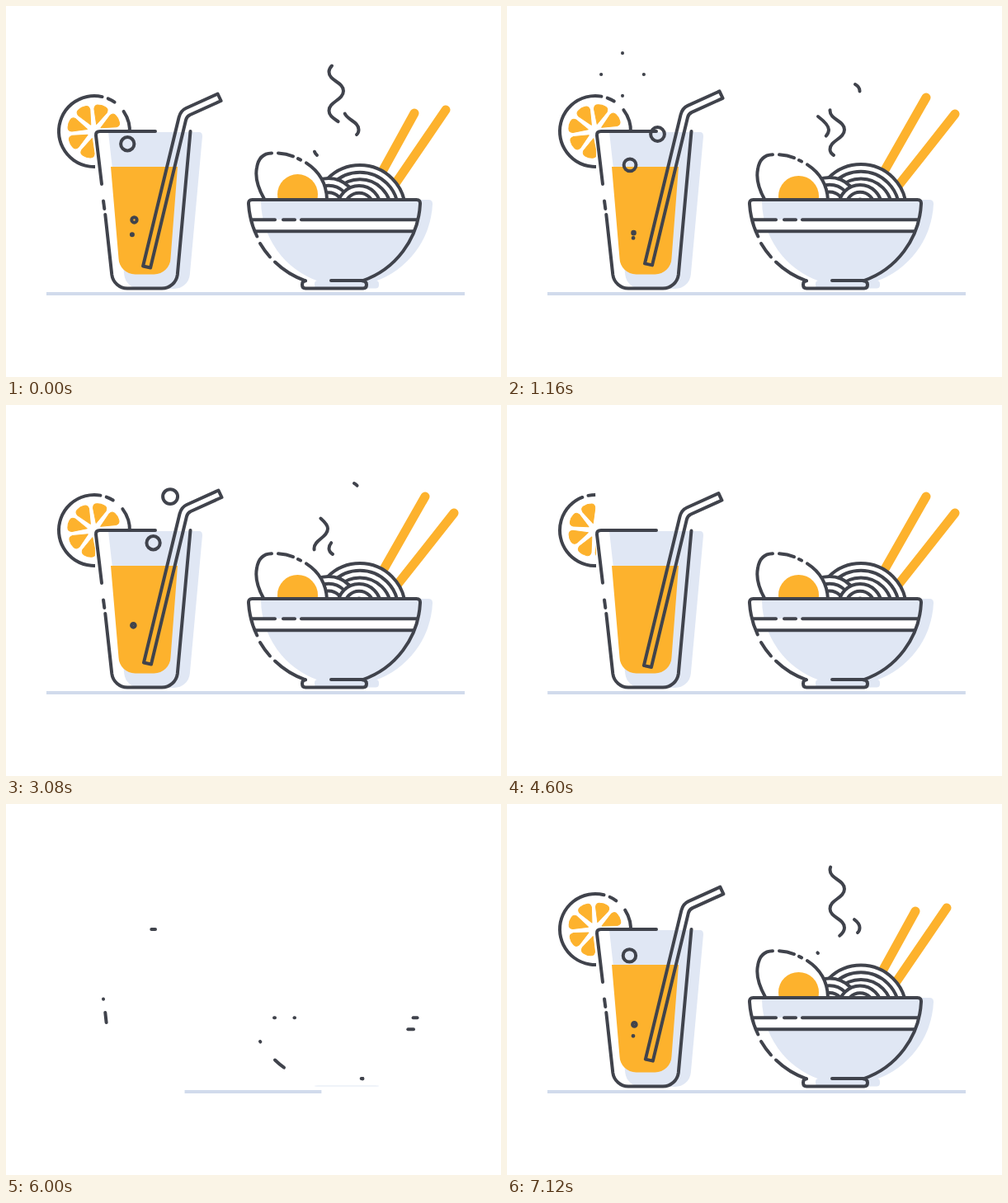
Recreate the animation shown at these times as an HTML page. Size 600x450 px, loop 7160 ms.

```html
<!DOCTYPE html>
<html>
<head>
<meta charset="utf-8">
<style>
  html, body { margin: 0; width: 100%; height: 100%; overflow: hidden; background: #fff; }
  svg { display: block; width: 100vw; height: 100vh; }
  .ink { fill: none; stroke: #40434c; stroke-width: 4; stroke-linecap: round; stroke-linejoin: round; }
  .white { fill: #fff; }
  .shade { fill: #e0e7f4; }
  .gold { fill: #fdb22d; }
  .stick { stroke: #fdb22d; stroke-width: 11; stroke-linecap: round; }
</style>
</head>
<body>
<svg viewBox="0 0 600 450">
  <defs>
    <clipPath id="aboveRim"><rect width="600" height="235"/></clipPath>
    <clipPath id="pie"><path id="piePath"/></clipPath>
  </defs>
  <line id="ground" y1="349" y2="349" stroke="#d1dbec" stroke-width="4"/>
  <g clip-path="url(#pie)"><g id="slice"></g></g>

  <path id="glassShade" class="shade" d="M124 153H234Q238 153 238 158L222.800 326A19 19 0 0 1 204 343H162A19 19 0 0 1 143.300 326Z"/>
  <path id="liquid" class="gold" d="M127 195H208L199.500 306A20 20 0 0 1 179.500 325.500H156.500A20 20 0 0 1 136.500 306Z"/>

  <g clip-path="url(#aboveRim)">
    <line id="stick1" class="stick" x2="429" y2="250"/>
    <line id="stick2" class="stick" x2="445" y2="255"/>
    <g id="noodles"></g>
    <g id="egg">
      <path class="white" d="M313 236C305 222 302 208 304 198C306 185 314 180 324 180C350 180 388 200 389 236Z"/>
      <circle class="gold" cx="353.500" cy="230.500" r="24.500"/>
      <path class="ink" d="M313 236C305 222 302 208 304 198C306 185 313 180.500 322 180.300M330 180.300Q340 181 348 184.200M354 187L357 188.500M364 192.300Q388 208 389 236"/>
    </g>
  </g>

  <path id="bowlShade" class="shade" d="M309 235H512Q517 235 517 240A104 104 0 0 1 447 334H379A104 104 0 0 1 309 236Z"/>
  <rect id="baseShade" class="shade" x="374" y="333" width="78" height="9.500" rx="4"/>
  <path class="white" d="M297 259H499L495 273H301Z"/>
  <g id="lines"></g>
  <g id="bubbles"></g>
  <path id="straw" class="ink" pathLength="1" d="M167 312.500L210.500 132Q212.500 124 219 121L257.500 103.500L261.500 112L224 129Q220 131 219 135L176 314.500Z"/>
  <g id="steam"></g>
</svg>
<script>
const LOOP = 7160;
const SKIP = 120;                   // hard cut where the loop closes
const OUT = 4520 - LOOP - SKIP;     // exit and entrance, on a clock that
const IN = 5960 - LOOP - SKIP;      // reads 0 when the loop begins

const $ = id => document.getElementById(id);
function set(el, attrs) {
  for (const k in attrs) el.setAttribute(k, attrs[k]);
}
function add(parent, tag, attrs) {
  const el = document.createElementNS('http://www.w3.org/2000/svg', tag);
  set(el, attrs);
  return parent.appendChild(el);
}
const ink = (id, d) => add($(id), 'path', { class: 'ink', pathLength: 1, d });
const show = (el, on) => { el.style.visibility = on ? 'visible' : 'hidden'; };

const clamp = x => Math.min(1, Math.max(0, x));
const sine = x => (1 - Math.cos(Math.PI * clamp(x))) / 2;
const back = x => { x = clamp(x); return x * x * (2.7 * x - 1.7); };

// 0 while in place, 1 while gone
const away = (c, outWait, inWait, len, ease = clamp) =>
  c < IN ? ease((c - OUT - outWait) / len) : ease(1 - (c - IN - inWait) / len);

// damped swing after the entrance
const swing = (c, amp, phase) =>
  c < IN ? 0 : amp * Math.exp(-Math.max(c, -200) / 350) * Math.cos(2 * Math.PI * c / 450 + phase);

function trim(el, from, to) {
  show(el, to > from);
  set(el, { 'stroke-dasharray': `${Math.max(0, to - from)} 2`, 'stroke-dashoffset': -from });
}

// point at a clockwise angle from straight up
function polar(cx, cy, r, deg) {
  const a = deg * Math.PI / 180;
  return `${cx + r * Math.sin(a)} ${cy - r * Math.cos(a)}`;
}
const arc = (cx, cy, r, a, b) =>
  `M${polar(cx, cy, r, a)}A${r} ${r} 0 ${+(b - a > 180)} 1 ${polar(cx, cy, r, b)}`;

// citrus slice
const slice = $('slice');
add(slice, 'circle', { class: 'white', cx: 107, cy: 152, r: 43 });
for (let i = 0; i < 8; i++) {
  add(slice, 'path', {
    class: 'gold', stroke: '#fdb22d', 'stroke-linejoin': 'round',
    d: 'M0-9L-8-26Q-9-31-4.500-32Q0-33.300 4.500-32Q9-31 8-26Z',
    transform: `translate(107 152) rotate(${14 + 45 * i})`
  });
}
for (const [a, b] of [[160, 370], [20, 32], [53, 92]])
  add(slice, 'path', { class: 'ink', d: arc(107, 152, 43, a, b) });

// noodle hills: centre, largest radius
for (const [cx, cy, size] of [[429, 247, 55], [391, 243, 35], [428, 243, 26]]) {
  for (let i = 0; i < 3; i++) {
    const ring = add($('noodles'), 'circle', { class: 'ink', cx, cy, r: size - 8.7 * i });
    if (!i) ring.style.fill = '#fff';
  }
}

// outlines; the power makes a line start early (< 1) or late (> 1)
const lines = [
  ['M181 152H114Q108.500 152 109 157L116 216'],
  ['M118 236.500L119.300 246'],
  ['M120.300 253L128.300 326A19 19 0 0 0 147 342.500H189A19 19 0 0 0 207.800 326L223.500 152'],
  ['M432 333.300A104 104 0 0 0 502 240Q502.400 235 497.500 235H298.500Q293.600 235 294 240A104 104 0 0 0 304.300 279.500', 2],
  ['M432 333H394'],
  ['M308 288Q313 296.500 320 304.500'],
  ['M326 310.500Q342 326 363 333.300', 1 / 3],
  ['M432 333.300Q437 334 437 338Q437 342.500 433 342.500H363Q359 342.500 359 338Q359 333.500 363 333.300', 2],
  ['M326 259.300H299'],
  ['M350 259.300H336'],
  ['M498.500 259.300H358'],
  ['M494 273.300H303']
].map(([d, power = 1]) => ({ power, el: ink('lines', d) }));

// steam wisps, drawn upwards: path, start of the main puff
const wisps = [
  ['M396 181Q391.500 178 391.500 174C391.500 163 409 161 409 150S391.500 138 391.500 127S409 114 409 103S391.500 91 391.500 80Q391.500 76 395 72.500', 506],
  ['M425 156Q427.500 154 427.500 150C427.500 139 410 138 410 127S427.500 114 427.500 103Q427.500 98 422 95', 1220],
  ['M377 181Q373.500 178 373.500 174C373.500 163 390 161 390 150Q390 144 377 134', -250]
].map(([d, start]) => ({ start, el: ink('steam', d) }));

// bubbles drift to one of two places and pop there
const right = { drift: 63, height: 213, spark: 12 };
const left = { drift: -13, height: 201, spark: 2.5 };
const bubbles = [
  [-2160, .005, left], [-900, .0055, right], [-430, .006, left],
  [600, .0053, right], [830, .0048, right], [2060, .004, right]
].map(([born, speed, path]) => ({
  born, speed, path,
  pop: born + Math.sqrt(path.height) / speed,
  ring: add($('bubbles'), 'circle', { class: 'ink' }),
  burst: add($('bubbles'), 'path', { class: 'ink' })
}));

function drawBubble(b, c) {
  const { drift, height, spark } = b.path;
  const h = Math.min(height, (b.speed * (c - b.born)) ** 2);
  const x = 153 + drift * (h / height) ** 1.5;
  const y = 284 - h;
  const size = (2 + 9.5 * (1 - Math.exp(-h / 60))) * sine((c + 1000) / 500) * (1 - sine((c - 3300) / 900));
  show(b.ring, c > b.born && c < b.pop && size > 0);
  set(b.ring, { cx: x, cy: y, r: Math.max(size - 2, size / 2) });
  b.ring.style.strokeWidth = Math.min(4, size);

  const a = (c - b.pop) / 500;
  const on = a > 0 && a < 1 && b.pop < 3600;
  show(b.burst, on);
  if (!on) return;
  const outer = 26 * (1 - (1 - a) ** 2);
  const inner = Math.max(0, outer - spark * Math.sin(Math.PI * a));
  set(b.burst, { d: [0, 90, 180, 270].map(d => `M${polar(x, y, inner, d)}L${polar(x, y, outer, d)}`).join('') });
}

// puffs follow one another more and more slowly
function drawWisp({ start, el }, c) {
  const begin = n => start + 2048 * n + 240 * n * n;
  const n = [1, 0, -1].find(n => c >= begin(n) && begin(n) > IN);
  if (n === undefined) return show(el, false);
  const age = (c - begin(n)) / 1300;
  const lead = sine(age) * sine((c + 1000) / 500);
  trim(el, Math.max(sine(age - .585), sine((c - 3600) / 640)), lead);
}

const move = (id, x, y) => set($(id), { transform: `translate(${x} ${y})` });
const grow = (id, k, y) => set($(id), { transform: `translate(0 ${y}) scale(1 ${k}) translate(0 ${-y})` });

function drawStick(id, c, [x, y], [leanX, leanY], slope) {
  const lean = c < IN ? 0 : 1 - sine(c / 700);
  const gone = 125 * away(c, 80, 300, 400, back);
  set($(id), { x1: x + leanX * lean, y1: y + leanY * lean });
  move(id, -slope * gone, gone);
}

function render(ms) {
  const c = ms < 4400 ? ms : ms - LOOP - SKIP;

  const drawn = 1 - away(c, 80, 20, 600);
  for (const l of lines) trim(l.el, 0, drawn ** l.power);
  const g = Math.cbrt(drawn);
  set($('ground'), { x1: 298 - 249 * g, x2: 298 + 258 * g });

  const shade = 1 - away(c, 80, 40, 500, sine);
  grow('glassShade', shade, 343);
  grow('bowlShade', shade, 343);
  grow('baseShade', drawn ** .66, 342.5);
  grow('liquid', 1 - away(c, 80, 300, 450, sine), 325.5);

  const turn = away(c, 0, 400, 240);
  show(slice, turn < 1);
  set($('piePath'), { d: arc(108, 152, 55, 180, 450 - 270 * turn) + 'L108 152Z' });
  set(slice, { transform: `rotate(${swing(c, 6.3, 1.08) - 93 * turn} 107 152)` });

  const dip = swing(c, 3, 0) - 50 * away(c, 0, 300, 300, back);
  move('straw', -.3 * dip, dip);
  trim($('straw'), 0, 1 - away(c, 80, 250, 350));

  move('egg', 0, swing(c, 3.7, 4.16) + 75 * away(c, 80, 400, 400, back));
  move('noodles', 0, swing(c, 3.7, 1.3) + 60 * away(c, 80, 400, 400, back));
  drawStick('stick1', c, [508, 111], [-13, 19], .57);
  drawStick('stick2', c, [543, 131], [-10, -5], .79);

  for (const w of wisps) drawWisp(w, c);
  for (const b of bubbles) drawBubble(b, c);
}

function frame() {
  render(performance.now() % LOOP);
  requestAnimationFrame(frame);
}
frame();
</script>
</body>
</html>
```
